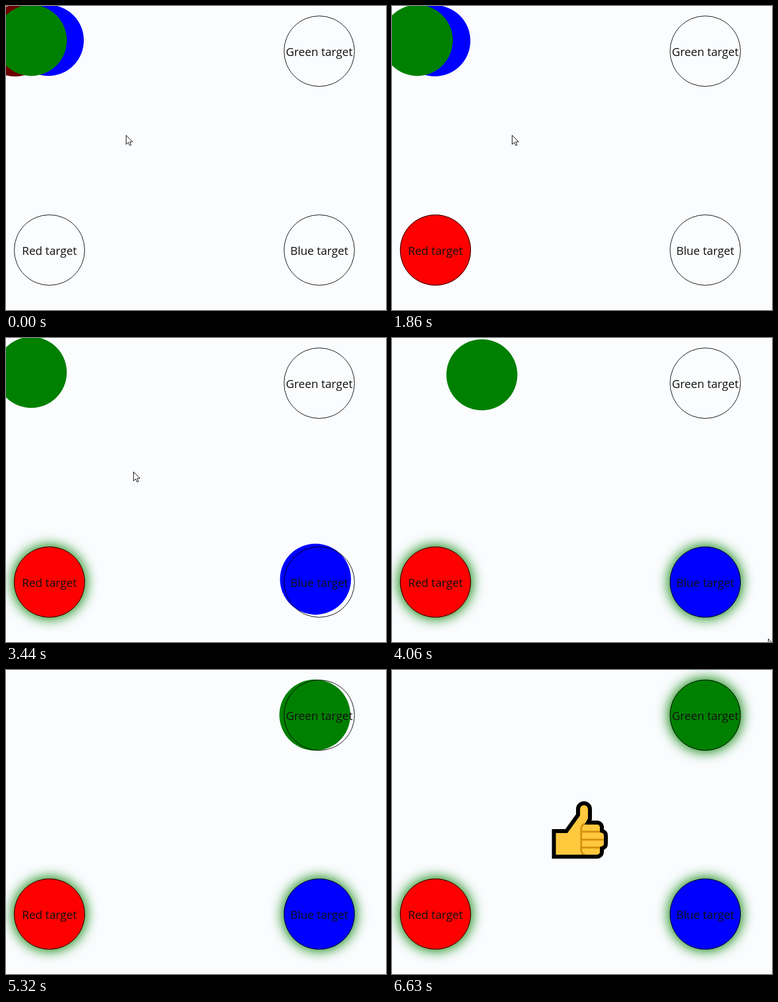
Recreate the animation shown at these times as an HTML page. Size 669x535 px, loop 7500 ms.

```html
<!DOCTYPE html>
<html lang="en">
<head>
<meta charset="utf-8">
<title>Color targets</title>
<style>
  html, body { margin: 0; width: 100%; height: 100%; overflow: hidden; background: #fafcfe; }
  svg { display: block; width: 669px; height: 535px; }
  text { font: 20px "Open Sans", sans-serif; fill: #111; text-anchor: middle; }
  .ring { fill: none; stroke: #000; }
</style>
</head>
<body>
<svg viewBox="0 0 669 535">
  <defs>
    <filter id="blur" x="-60%" y="-60%" width="220%" height="220%" color-interpolation-filters="sRGB">
      <feGaussianBlur stdDeviation="11"/>
    </filter>
  </defs>
  <g id="glows"></g>
  <g id="balls"></g>
  <g id="targets"></g>
  <g id="thumb" stroke-linejoin="round">
    <path id="hand" fill="#ffc83d" d="M285 283.5H307L327.5 255V245a10.5 10.5 0 0 1 21 0V262L345 268.5H361a8.5 8.5 0 0 1 8.5 8.5V283Q376.5 285 376.5 291V306Q376.5 312 369.5 314V320a8.5 8.5 0 0 1 -8.5 8.5H285Z"/>
    <path fill="none" stroke="#d6930f" stroke-width="3.4" d="M344 269.5Q333 271 333 280V316Q333 324 341 326M333 284.5H367M333 298.5H374M333 312.5H367"/>
    <path id="edge" fill="none" stroke="#000" stroke-width="7" stroke-linejoin="miter"/>
  </g>
  <path id="cursor" fill="#fff" stroke="#000" d="M.5 .5V16.5L4.3 13L6.8 18.5L9.3 17.5L6.9 12H11.8Z"/>
</svg>
<script>
const LOOP = 7500;
const $ = id => document.getElementById(id);
const lerp = (a, b, p) => a + (b - a) * p;
const ramp = (t, start, length) => Math.min(1, Math.max(0, (t - start) / length));

// The CSS "ease" curve, cubic-bezier(.25, .1, .25, 1).
function ease(x) {
  if (x <= 0 || x >= 1) return x <= 0 ? 0 : 1;
  const curve = (s, a, b) => 3 * (1 - s) ** 2 * s * a + 3 * (1 - s) * s * s * b + s ** 3;
  let low = 0, high = 1;
  for (let i = 0; i < 24; i++) {
    const mid = (low + high) / 2;
    if (curve(mid, .25, .25) < x) low = mid; else high = mid;
  }
  return curve(low, .1, 1);
}

function add(parent, tag, attrs) {
  const el = document.createElementNS("http://www.w3.org/2000/svg", tag);
  set(el, attrs);
  $(parent).append(el);
  return el;
}

function set(el, attrs) {
  for (const key in attrs) el.setAttribute(key, attrs[key]);
}

const balls = [
  { name: "Red", color: "red", from: 14.5, x: 76.5, y: 429.5, start: -12, bend: .65 },
  { name: "Blue", color: "blue", from: 74.5, x: 551.5, y: 429.5, start: 1852, bend: 1 },
  { name: "Green", color: "green", from: 44.5, x: 551.5, y: 79.5, start: 3745, bend: 1 }
];
const TRAVEL = 1877, TOP = 60.5;

for (const b of balls) {
  b.glow = add("glows", "circle", { cx: b.x, cy: b.y, r: 64.5, fill: "green", filter: "url(#blur)" });
  b.el = add("balls", "circle", { r: 62.5, fill: b.color });
  add("targets", "circle", { class: "ring", cx: b.x, cy: b.y, r: 62 });
  add("targets", "text", { x: b.x, y: b.y + 8.5 }).textContent = b.name + " target";
}
$("edge").setAttribute("d", $("hand").getAttribute("d"));

function cursorAt(t) {
  if (t < 3860) {
    const p = ease(ramp(t, 3420, 440));
    return [lerp(211, 643, p), lerp(227, 493, p)];
  }
  const p = (t - 3860) / 200;
  return [lerp(643, 662, p), lerp(493, 529, p)];
}

function draw(t) {
  for (const b of balls) {
    const p = ease(ramp(t, b.start, TRAVEL));
    set(b.el, { cx: lerp(b.from, b.x, p ** b.bend), cy: lerp(TOP, b.y, p) });
    b.glow.setAttribute("opacity", ease(ramp(t, b.start + TRAVEL, 300)));
  }
  balls[0].el.setAttribute("fill", `rgb(${Math.round(lerp(107, 255, ramp(t, 0, 200)))},0,0)`);

  const shown = ease(ramp(t, 5700, 930));
  set($("thumb"), {
    opacity: shown,
    transform: `translate(331 281.2) scale(${lerp(1.16, 1, shown)}) translate(-331 -281.2)`
  });

  set($("cursor"), {
    transform: `translate(${cursorAt(t).map(Math.round)})`,
    visibility: t < 4110 ? "visible" : "hidden"
  });
}

const begin = performance.now();
function tick() {
  draw((performance.now() - begin) % LOOP);
  requestAnimationFrame(tick);
}
draw(0);
requestAnimationFrame(tick);
</script>
</body>
</html>
```
